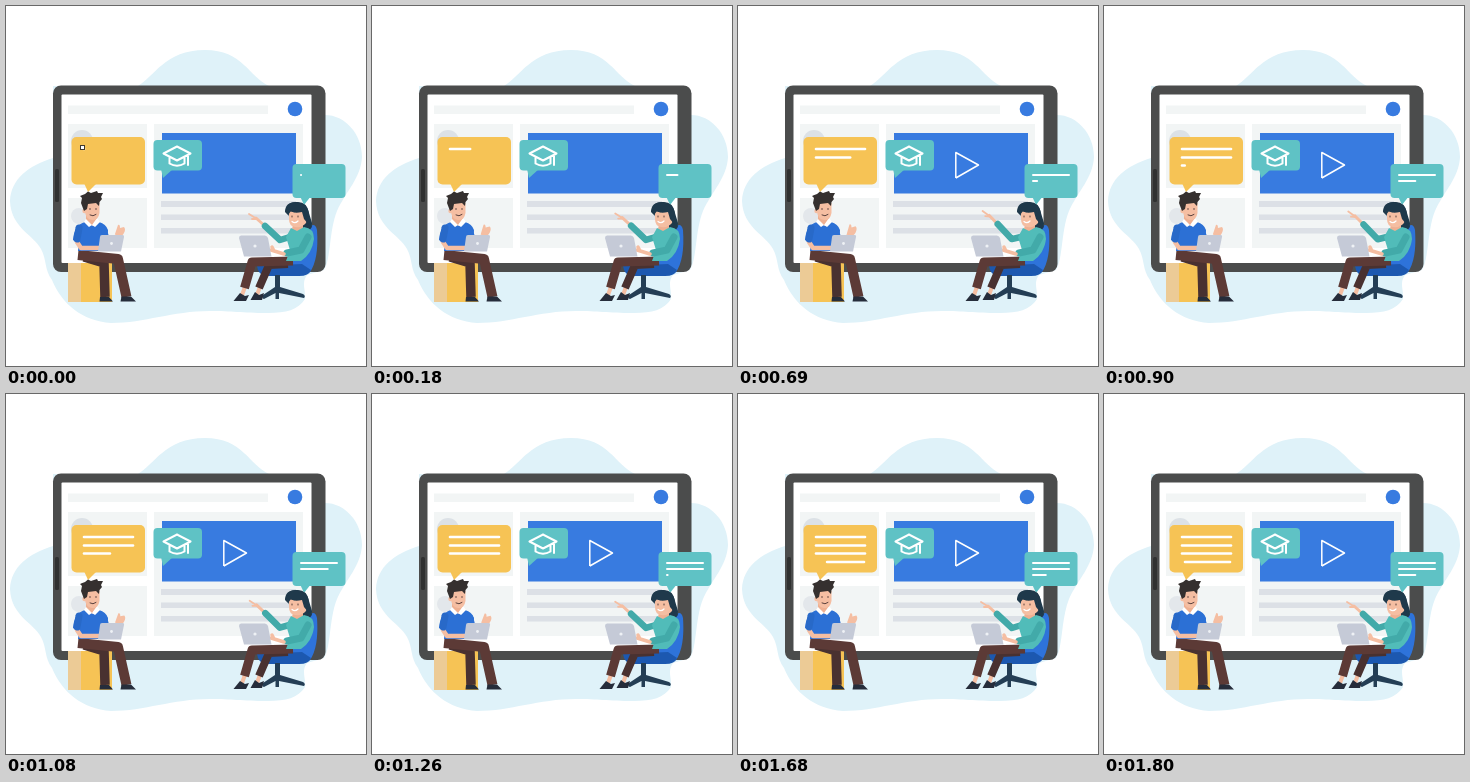
These frames come from a looping animation (360 by 360 pixels, 1.86 s). An HTML page:

```html
<!DOCTYPE html>
<html lang="en">
<head>
<meta charset="utf-8">
<title>Online lesson</title>
<style>
html, body { margin: 0; width: 100%; height: 100%; overflow: hidden; background: #fff; }
svg { display: block; width: 100vw; height: 100vh; }
.line { fill: none; stroke-linecap: round; stroke-linejoin: round; }
.flat { stroke-linecap: butt; }
</style>
</head>
<body>
<svg viewBox="0 0 360 360">
  <path fill="#dff2f9" d="M132 80C148 71 159 44 199 44C237 44 243 71 263 80L319 109C339 109 356 128 356 151C355 172 340 185 331 205C323 225 325 253 318 264L301 269C295 277 300 284 299 293C292 304 280 307 262 307C235 307 226 305 204 305C166 305 139 317 105 317C76 315 56 298 46 274C38 263 41 254 35 243C28 229 5 222 4 195C5 173 22 160 47 152V80Z"/>

  <!-- tablet -->
  <rect x="47" y="79.500" width="272.500" height="186.500" rx="8" fill="#4b4c4c"/>
  <rect x="55.500" y="88.500" width="250" height="168.500" rx="1" fill="#fff"/>
  <rect x="49" y="163" width="4" height="33" rx="1.500" fill="#303131"/>
  <path fill="#f2f5f5" d="M62 99.500H262V108H62ZM62 118H141V182H62ZM62 192H141V242H62ZM148 118H297V242H148Z"/>
  <circle cx="289" cy="103" r="7.300" fill="#387be0"/>
  <circle cx="76" cy="135" r="11" fill="#dce1e6"/>
  <circle cx="73" cy="210" r="8" fill="#e3e7eb"/>
  <rect x="156" y="127" width="134" height="60.500" fill="#387be0"/>
  <path fill="#dce0e6" d="M155 195H290V201H155ZM155 208.500H290V214H155ZM155 222H290V227.500H155Z"/>
  <path id="play" class="line flat" pathLength="1" stroke-dasharray="1 2" stroke="#fff" stroke-width="1.500" d="M217.800 172L240.500 159L217.800 146.500Z"/>

  <!-- speech bubbles -->
  <g fill="#5fc2c5">
    <path d="M155 163L157 172L167 163Z"/>
    <rect x="147.500" y="134" width="48.500" height="30.500" rx="4"/>
    <path d="M294 190L298 199L305 190Z"/>
    <rect x="286.500" y="158" width="53" height="34" rx="4"/>
  </g>
  <path class="line" stroke="#fff" stroke-width="2" d="M157.500 147.500L171 140.500L184.500 147.500L171 154.500ZM163.500 152V157.500Q171 162 178.500 157.500V152M182 149V159"/>
  <path fill="#f6c355" d="M78 177L82 186L91 177Z"/>
  <rect x="65.500" y="131" width="73.500" height="47.500" rx="5" fill="#f6c355"/>
  <g id="text" class="line" stroke="#fff"></g>
  <rect id="spot" x="74.500" y="139.500" width="4" height="4" fill="#fff" stroke="#40392d"/>

  <!-- man -->
  <rect x="62" y="257" width="44" height="39" fill="#f6c355"/>
  <rect x="62" y="257" width="13" height="39" fill="#eccb96"/>
  <path class="line flat" stroke="#493130" stroke-width="9.500" d="M78 251L98 257L99 291"/>
  <path class="line flat" stroke="#5c3a36" stroke-width="10" d="M72 249L112 253L120.500 291"/>
  <path fill="#262d3b" d="M94 291H103L107 295.500H93.500ZM115.500 290.500H125L130 295.500H114.500Z"/>
  <path fill="#eeb092" d="M80 207H91V217L86 220L80 216Z"/>
  <path fill="#2c70d5" d="M79 216L87 220L93 216Q100 218 102 224L101 245H72L73 236L67 234Q68 219 79 216Z"/>
  <path fill="#fff" d="M78 216L80 213L86 219L91 212L94 216L89 221L86 219L83 221Z"/>
  <path fill="#f5bea2" d="M80 197H93.500V207Q92 215 86 214Q80 213 79 206Z"/>
  <circle cx="78.500" cy="205" r="2.200" fill="#f5bea2"/>
  <path fill="#35302f" d="M78 205L75 197L76 192L74 190L79 188L82 185.500L85 187L91 185L92 187L97 187L95 191L96 193L93.500 196L93 200L90 197L82 198L81 203Z"/>
  <path class="line" stroke="#493433" stroke-width=".9" d="M84 202.500V203.500M90 202.500V203.500M84 209Q87 211 90 208.500"/>
  <g id="manArm">
    <path class="line" stroke="#f5bea2" stroke-width="3.500" d="M102 235L112 229"/>
    <path fill="#f5bea2" d="M109 228L112 219Q114 218 114 222L118 221Q120 223 118 227Q116 231 112 231Z"/>
    <path class="line" stroke="#2c70d5" stroke-width="6" d="M98 224L100 231"/>
  </g>
  <path class="line" stroke="#f5bea2" stroke-width="4.500" d="M71 236L75 242L94 242"/>
  <path class="line" stroke="#2869c8" stroke-width="7" d="M73 222L71 233"/>
  <path fill="#c5cad7" d="M96 229H116.500Q118.500 229 118 231L115 245.500H92L94 231Q94 229 96 229Z"/>
  <circle cx="105.500" cy="237.500" r="1.400" fill="#eef1f5"/>

  <!-- woman -->
  <path fill="#2e73da" d="M302 222Q309 215 311 224Q313 253 304 266Q295 269 281 266L279 252Q302 246 302 222Z"/>
  <path fill="#1c58b0" d="M251 260L296 258L305 264Q303 270 293 270H259Q252 268 251 260Z"/>
  <path fill="#243e55" d="M269 269H274V281L297 288Q300 290 298 292L273 287V293H269.500V287L258 293Q255 292 257 289L269 281Z"/>
  <path class="line flat" stroke="#f5bea2" stroke-width="4" d="M240 278L236 289M255 278L251 289"/>
  <path class="line flat" stroke="#493130" stroke-width="8" d="M282 258L263 259L253 282"/>
  <path class="line flat" stroke="#5c3a36" stroke-width="9" d="M287 255L246 256L238.500 282"/>
  <path fill="#262d3b" d="M234 287L239 290L243 289L240 295H227.500ZM249 286L253 289L258 287L256 294H244.500Z"/>
  <path fill="#1f394b" d="M280 204Q281 196 290 196Q301 195 303 207L306 217Q307 225 298 225L288 221Z"/>
  <g id="womanArm">
    <path class="line" stroke="#f5bea2" stroke-width="3" d="M260 221L250 212"/>
    <path class="line" stroke="#f5bea2" stroke-width="1.800" d="M251 213L243 208M251 213L246 213"/>
    <path class="line" stroke="#42aaa9" stroke-width="6.500" d="M287 230L274 234L259 220"/>
  </g>
  <path fill="#eeb092" d="M288 215H297V224L291 227L286 223Z"/>
  <path fill="#51bcb9" d="M285 222L291 225L298 221Q308 222 308 233Q306 248 295 255H280L284 244L280 231Z"/>
  <path fill="#f5bea2" d="M283 205Q291 208 296 203L302 208L300 217Q296 222 289 221Q283 220 283 213Z"/>
  <path fill="#1f394b" d="M279 206Q279 196 290 196Q302 197 303 208L303 219L298 213L296 206Q288 208 285 205L282 209Z"/>
  <path class="line" stroke="#493433" stroke-width=".9" d="M286 210V211M292 210V211"/>
  <path class="line" stroke="#fff" stroke-width="1.200" d="M286 215.500Q289 218 292 215"/>
  <path class="line" stroke="#42aaa9" stroke-width="7" d="M302 231L295 244L281 247"/>
  <path class="line" stroke="#f5bea2" stroke-width="3.500" d="M278 248L265 244M268 245L266 241"/>
  <path fill="#c5cad7" d="M235 229.500H259Q261.500 230 262 232L265.500 250.500H238L233 232Q233 229.500 235 229.500Z"/>
  <circle cx="249" cy="240" r="1.600" fill="#eef1f5"/>
</svg>
<script>
const LOOP = 1860;
const el = id => document.getElementById(id);
const clamp = v => Math.min(1, Math.max(0, v));

// x, y, length, start, duration, stroke width
const lines = [
  [78, 143, 49, 0, 440, 2.6],
  [78, 151.5, 49, 440, 360, 2.6],
  [78, 159.5, 49, 880, 380, 2.6],
  [126, 168, -45, 1320, 440, 2.6],
  [295, 169, 36, 0, 620, 2],
  [295, 175, 36, 620, 620, 2],
  [295, 181, 18, 1240, 620, 2]
].map(([x, y, length, start, duration, width]) => {
  const node = document.createElementNS("http://www.w3.org/2000/svg", "line");
  const set = (name, value) => node.setAttribute(name, value);
  set("x1", x);
  set("y1", y);
  set("y2", y);
  set("stroke-width", width);
  el("text").append(node);
  return t => {
    set("visibility", t > start ? "visible" : "hidden");
    set("x2", x + length * clamp((t - start) / duration));
  };
});

function draw(now) {
  const t = now % LOOP;
  for (const grow of lines) grow(t);
  el("spot").setAttribute("visibility", t < 30 ? "visible" : "hidden");
  el("play").setAttribute("stroke-dashoffset", 1 - clamp((t - 200) / 480));

  const lift = t < 1400 ? (1 - Math.cos(2 * Math.PI * t / 1400)) / 2 : 0;
  const sway = -3 * Math.sin(2 * Math.PI * t / LOOP);
  el("womanArm").setAttribute("transform", `rotate(${4 * lift} 287 229)`);
  el("manArm").setAttribute("transform", `rotate(${sway} 100 233)`);
  requestAnimationFrame(draw);
}
draw(0);
</script>
</body>
</html>
```
